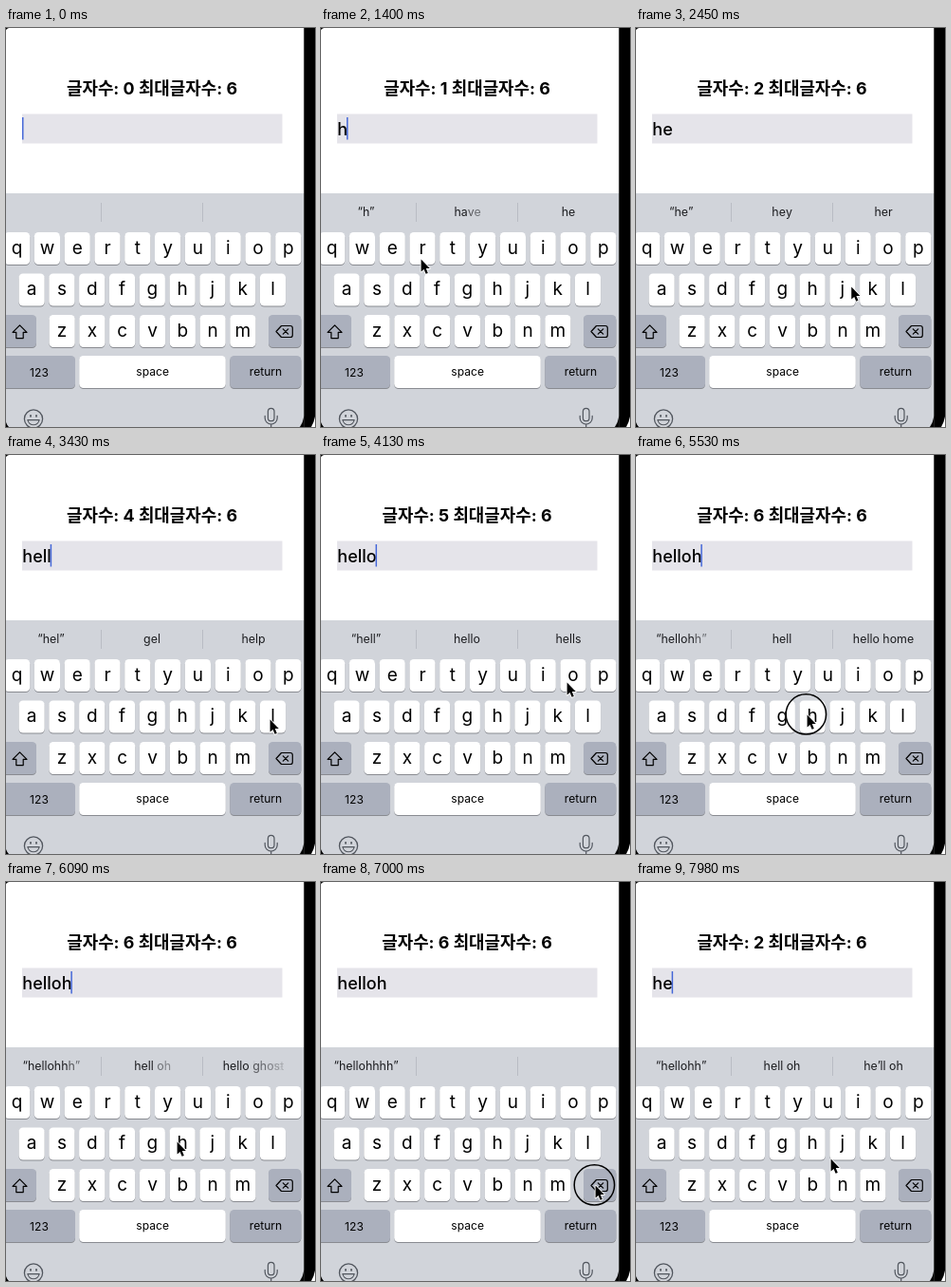
Write an HTML page with a canvas that moves like this. It is 326 by 420 pixels and loops after 8000 ms.

```html
<!DOCTYPE html>
<html lang="ko">
<head>
<meta charset="utf-8">
<title>글자수 제한 입력</title>
<style>
  html, body { margin: 0; width: 100%; height: 100%; overflow: hidden; background: #fff; }
  canvas { display: block; width: 326px; height: 420px; }
</style>
</head>
<body>
<canvas id="stage"></canvas>
<script>
const W = 326, H = 420, LOOP = 8000, STEP = 70;
const LATIN = 'Inter, "Noto Sans", sans-serif';
const KOREAN = 'Inter, "Noto Sans CJK KR", "Noto Sans CJK JP", sans-serif';

const canvas = document.getElementById('stage');
const ctx = canvas.getContext('2d');
const dpr = window.devicePixelRatio || 1;
canvas.width = W * dpr;
canvas.height = H * dpr;

// Each table row starts with its time in ms.
const typed = [
  [0, ''], [1050, 'h'], [1820, 'he'], [3080, 'hel'], [3360, 'hell'], [4130, 'hello'],
  [5040, 'helloh'], [7070, 'hello'], [7490, 'hell'], [7560, 'hel'], [7700, 'he']
];
const suggestions = [
  [0, '', '', ''],
  [1120, '“h”', 'ha', 'he'],
  [1260, '“h”', 'have', 'he'],
  [1960, '“he”', 'hey', 'her'],
  [3150, '“hel”', 'gel', 'help'],
  [3500, '“hell”', 'hello', 'hells'],
  [4270, '“hello”', 'hello’s', 'hellos'],
  [5110, '“helloh”', 'hell', 'hello home'],
  [5390, '“hellohh”', 'hell', 'hello home'],
  [5950, '“hellohhh”', 'hell oh', 'hello ghost'],
  [6300, '“hellohhhh”', '', ''],
  [7280, '“hellohhh”', 'hell oh', 'hello ghost'],
  [7490, '“hellohh”', 'hell oh', 'he’ll oh']
];
const pointer = [
  [70, 290, 391], [700, 182, 273], [1190, 182, 273], [1400, 105, 243], [1600, 76, 240],
  [1900, 76, 240], [2590, 265, 280], [2750, 278, 278], [3480, 278, 278], [3780, 259, 239],
  [4200, 259, 239], [4690, 177, 270], [4830, 177, 270], [4970, 180, 273], [6160, 180, 273],
  [6580, 284, 319], [6700, 289, 319], [7740, 289, 319], [7980, 205, 291]
];
const clicks = [
  [910, 1050], [1680, 1820], [3010, 3150], [3220, 3360], [3920, 4130],
  [4970, 5110], [5250, 5390], [5530, 5670], [5810, 5950], [7000, 7140]
];
const caretOff = [[350, 750], [1610, 1820], [2450, 2800], [3850, 4130], [4690, 5040], [6720, 7070]];
const deleteHeld = [[7070, 7750]];

const clamp = v => Math.max(0, Math.min(1, v));
const lerp = (a, b, k) => a + (b - a) * k;
const within = (spans, t) => spans.some(([a, b]) => t >= a && t < b);
const indexAt = (rows, t) => rows.findLastIndex(row => row[0] <= t);

function setFont(size, weight = 400, family = LATIN) {
  ctx.font = `${weight} ${size}px ${family}`;
}

function label(text, x, y, align = 'center') {
  ctx.textAlign = align;
  ctx.fillText(text, x, y);
}

function line(d, width, color = '#000') {
  ctx.strokeStyle = color;
  ctx.lineWidth = width;
  ctx.lineJoin = ctx.lineCap = 'round';
  ctx.stroke(new Path2D(d));
}

function fill(d, color) {
  ctx.fillStyle = color;
  ctx.fill(new Path2D(d));
}

function box(x, y, w, h, color) {
  ctx.fillStyle = color;
  ctx.fillRect(x, y, w, h);
}

function key(x, y, w, color = '#fff') {
  for (const [dy, paint] of [[1, '#898b91'], [0, color]]) {
    ctx.fillStyle = paint;
    ctx.beginPath();
    ctx.roundRect(x, y + dy, w, 34, 4.5);
    ctx.fill();
  }
}

function keyRow(letters, x, y) {
  [...letters].forEach((letter, i) => {
    const left = x + i * 31.8;
    key(left, y, 27.2);
    ctx.fillStyle = '#000';
    setFont(19);
    label(letter, left + 13.6, y + 22.7);
  });
}

function drawKeyboard(t) {
  const grey = '#abb0bd';
  box(0, 174, 314.5, 246, '#d1d4da');
  box(100, 184, 1, 20, '#b9bcc4');
  box(207, 184, 1, 20, '#b9bcc4');

  keyRow('qwertyuiop', -2, 215);
  keyRow('asdfghjkl', 13.5, 258.5);
  keyRow('zxcvbnm', 45.5, 302);

  key(-6, 302, 38, grey);
  line('M14.5 312.8L22 320.3H18.2V326.6H10.8V320.3H7Z', 1.2);
  key(277, 302, 34.3, within(deleteHeld, t) ? '#fff' : grey);
  line('M290.5 313.5H300Q302.3 313.5 302.3 315.8V323.2Q302.3 325.5 300 325.5H290.5L285 319.5Z', 1.2);
  line('M292.3 316.8L297.7 322.2M297.7 316.8L292.3 322.2', 1.2);

  key(-6, 345, 79, grey);
  key(77.2, 345, 154.6, '#fff');
  key(236.3, 345, 75, grey);
  ctx.fillStyle = '#000';
  setFont(12.1);
  label('123', 35, 366.5);
  label('space', 154.7, 366.2);
  label('return', 274, 366.2);

  const ink = '#51565e';
  line('M38.6 411.5A9.6 9.6 0 1 1 19.4 411.5A9.6 9.6 0 1 1 38.6 411.5Z', 1.3, ink);
  line('M26 407.8V408.8M32 407.8V408.8', 1.8, ink);
  line('M22.8 412.6H35.2Q33.6 417.8 29 417.8Q24.4 417.8 22.8 412.6Z', 1.1, ink);
  line('M276.4 403.6A3.3 3.3 0 0 1 283 403.6V410.4A3.3 3.3 0 0 1 276.4 410.4Z', 1.2, ink);
  line('M273.2 408.3V410.6A6.5 6.5 0 0 0 286.2 410.6V408.3M279.7 417.1V420', 1.2, ink);
}

// Shared letters slide along; the rest of the word fades over letter by letter.
function drawSuggestion(before, after, center, age) {
  const start = word => center - ctx.measureText(word).width / 2;
  const slide = clamp(age / 150);
  let same = 0;
  while (same < Math.min(before.length, after.length) && before[same] === after[same]) same++;
  const shared = after.slice(0, same);
  const left = before && after ? lerp(start(before), start(after), slide) : start(after || before);
  const tail = left + ctx.measureText(shared).width;

  label(shared, left, 198, 'left');
  ctx.globalAlpha = 1 - slide;
  label(before.slice(same), tail, 198, 'left');
  [...after.slice(same)].forEach((letter, i) => {
    const x = left + ctx.measureText(after.slice(0, same + i)).width;
    ctx.globalAlpha = clamp((age - i * 25) / 210);
    label(letter, x, 198, 'left');
  });
  ctx.globalAlpha = 1;
}

function drawSuggestions(t) {
  const i = indexAt(suggestions, t);
  const now = suggestions[i], last = suggestions[Math.max(0, i - 1)];
  ctx.fillStyle = '#1c1d20';
  setFont(12.4);
  [47.5, 154, 261].forEach((x, n) => drawSuggestion(last[n + 1], now[n + 1], x, t - now[0]));
}

function drawField(t) {
  const text = typed[indexAt(typed, t)][1];
  ctx.fillStyle = '#000';
  setFont(17.9, 700, KOREAN);
  label(`글자수: ${text.length} 최대글자수: 6`, 154, 70);

  box(17, 90.5, 274.5, 31, '#e5e4ea');
  ctx.fillStyle = '#000';
  setFont(18, 500);
  label(text, 17.3, 112.7, 'left');
  if (!within(caretOff, t)) {
    box(17 + ctx.measureText(text).width - (text ? 0.8 : 0), 94, 1.5, 23.5, '#4668d8');
  }
}

function drawPointer(t) {
  const i = indexAt(pointer, t);
  if (i < 0) return;
  const [t0, x0, y0] = pointer[i];
  const [t1, x1, y1] = pointer[i + 1] || [t0 + 1, x0, y0];
  const k = clamp((t - t0) / (t1 - t0));
  ctx.save();
  ctx.translate(lerp(x0, x1, k) + 0.6, lerp(y0, y1, k) + 0.6);
  if (within(clicks, t)) {
    ctx.strokeStyle = '#000';
    ctx.lineWidth = 1.5;
    ctx.beginPath();
    ctx.arc(-1.2, -0.7, 21.2, 0, Math.PI * 2);
    ctx.stroke();
  }
  const arrow = 'M0 0V13L3 10.4L5 15.2L7.2 14.3L5.2 9.5H9.2Z';
  line(arrow, 1.8, '#fff');
  fill(arrow, '#000');
  ctx.restore();
}

function draw(t) {
  ctx.setTransform(dpr, 0, 0, dpr, 0, 0);
  box(0, 0, W, H, '#fff');
  drawField(t);
  drawKeyboard(t);
  drawSuggestions(t);
  box(314.3, 0, 11.7, H, '#000');
  fill('M0 0H3Q1 .6 0 2ZM0 415Q1 418 3 420H0ZM314.5 408Q313.5 415 310 420H314.5Z', '#000');
  fill('M326 409Q325 415 322 420H326Z', '#fff');
  drawPointer(t);
}

const began = performance.now();
function tick() {
  const t = (performance.now() - began) % LOOP;
  draw(Math.floor(t / STEP) * STEP);
  requestAnimationFrame(tick);
}
tick();
</script>
</body>
</html>
```
